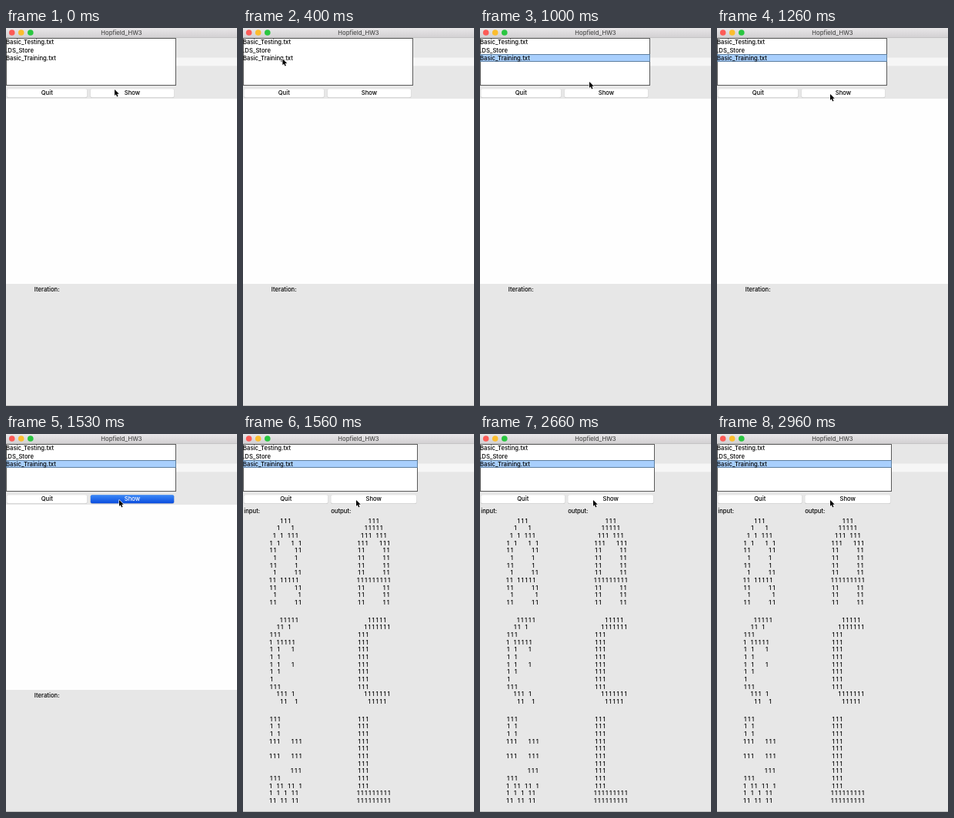
An HTML page with a canvas for the animation above (3000 ms loop, 300 px wide and 492 px high).

```html
<!DOCTYPE html>
<html lang="en">
<head>
<meta charset="utf-8">
<title>Hopfield_HW3</title>
<style>
html, body { margin: 0; width: 100%; height: 100%; overflow: hidden; background: #e7e7e7; }
canvas { display: block; }
</style>
</head>
<body>
<canvas id="stage" width="300" height="492"></canvas>
<script>
const ctx = document.getElementById('stage').getContext('2d');
const LOOP = 3000, SELECT = 500, PRESS = 1440, RESULT = 1560;
const FONT = '500 7.7px Inter, Roboto, sans-serif';
const ONE = 5, GAP = 4.5, PITCH = 9.64;

// Pointer keys: time, x, y
const PATH = [[30, 141, 80], [400, 51.4, 40.2], [590, 51.4, 40.2], [1000, 142, 70], [1100, 147, 86]];

const GRIDS = [
  { y: 113,
    input: ['   111   ', '  1   1  ', ' 1 1 111 ', '1 1   1 1', '11     11', ' 1     1 ',
            '11     1 ', ' 1     11', '11 11111 ', '11     11', ' 1      1', '11     11'],
    output: ['   111   ', '  11111  ', ' 111 111 ', '111   111', ...Array(4).fill('11     11'),
             '111111111', ...Array(3).fill('11     11')] },
  { y: 242,
    input: ['   11111 ', '  11 1   ', '111      ', '1 11111  ', '1 1   1  ', '1 1      ',
            '1 1   1  ', '1 1      ', '1        ', '111      ', '  111 1  ', '   11  1 '],
    output: ['   11111 ', '  1111111', ...Array(8).fill('111      '), '  1111111', '   11111 '] },
  { y: 371,
    input: ['111      ', '1 1      ', '1 1      ', '111   111', '', '111   111',
            '', '      111', '111      ', '1 11 11 1', '1 1 1 11 ', '11 11 11 '],
    output: [...Array(10).fill('111      '), '111111111', '111111111'] }
];

function rect(x, y, w, h, fill) {
  ctx.fillStyle = fill;
  ctx.fillRect(x, y, w, h);
}

function outline(x, y, w, h, stroke) {
  ctx.strokeStyle = stroke;
  ctx.lineWidth = 1;
  ctx.strokeRect(x + 0.5, y + 0.5, w - 1, h - 1);
}

function text(s, x, y, align = 'left', fill = '#000') {
  ctx.font = FONT;
  ctx.textAlign = align;
  ctx.fillStyle = fill;
  ctx.fillText(s, x, y);
}

function gradient(y0, y1, from, to) {
  const g = ctx.createLinearGradient(0, y0, 0, y1);
  g.addColorStop(0, from);
  g.addColorStop(1, to);
  return g;
}

function titleBar() {
  rect(0, 0, 300, 12, gradient(0, 12, '#e8e6e8', '#d3d1d3'));
  rect(0, 12, 300, 1, '#c4c4c4');
  [[7.7, '#fc5b57'], [19.7, '#fbbd2e'], [31.8, '#2ac640']].forEach(([x, fill]) => {
    ctx.fillStyle = fill;
    ctx.beginPath();
    ctx.arc(x, 6, 3.8, 0, Math.PI * 2);
    ctx.fill();
  });
  text('Hopfield_HW3', 150, 8.8, 'center', '#4a4a4a');
}

function listBox(w, selected) {
  rect(0, 13, w, 62, '#fff');
  outline(0, 13, w, 62, '#5a5a5a');
  if (selected) {
    rect(0, 34, w, 10, '#a8cffd');
    outline(0, 34, w, 10, '#5f7f9f');
  }
  ['Basic_Testing.txt', '.DS_Store', 'Basic_Training.txt']
    .forEach((name, i) => text(name, 0, 21.2 + i * 10.3));
}

function button(label, x, w, pressed) {
  ctx.beginPath();
  ctx.roundRect(x, 79.3, w, 11.6, 2);
  ctx.fillStyle = '#c9c9c9';
  ctx.fill();
  ctx.beginPath();
  ctx.roundRect(x + 0.3, 79.2, w - 0.6, 11.1, 2);
  ctx.fillStyle = pressed ? gradient(79, 91, '#3d8bf8', '#0748dc') : '#fff';
  ctx.fill();
  text(label, x + w / 2, 87.4, 'center', pressed ? '#fff' : '#000');
}

// Each line is centred; ones are a little wider than gaps.
function digits(rows, cx, top) {
  rows.forEach((row, r) => {
    const widths = [...row].map(c => c === '1' ? ONE : GAP);
    let x = cx - widths.reduce((a, b) => a + b, 0) / 2;
    widths.forEach((w, i) => {
      if (row[i] === '1') text('1', x + w / 2, top + r * PITCH + 2.8, 'center');
      x += w;
    });
  });
}

function pointerAt(t) {
  if (t <= PATH[0][0]) return PATH[0].slice(1);
  for (let i = 1; i < PATH.length; i++) {
    const [t0, x0, y0] = PATH[i - 1], [t1, x1, y1] = PATH[i];
    if (t < t1) {
      const p = (t - t0) / (t1 - t0), e = p * p * (3 - 2 * p);
      return [x0 + (x1 - x0) * e, y0 + (y1 - y0) * e];
    }
  }
  return PATH[PATH.length - 1].slice(1);
}

function pointer([x, y]) {
  ctx.save();
  ctx.translate(x, y);
  ctx.beginPath();
  [[0, 0], [0, 8], [1.8, 6.3], [3.1, 9.4], [4.5, 8.8], [3.2, 5.8], [5.8, 5.7]]
    .forEach(([px, py]) => ctx.lineTo(px, py));
  ctx.closePath();
  ctx.lineJoin = 'round';
  ctx.lineWidth = 1.2;
  ctx.strokeStyle = '#fff';
  ctx.stroke();
  ctx.fillStyle = '#000';
  ctx.fill();
  ctx.restore();
}

function draw(t) {
  const done = t >= RESULT;
  rect(0, 0, 300, 492, '#e7e7e7');
  rect(0, 38.5, 300, 10.8, '#f6f6f6');
  titleBar();
  listBox(done ? 227 : 221, t >= SELECT);
  if (done) {
    button('Quit', 1, 109.5, false);
    button('Show', 114, 111.5, false);
    text('input:', 1.3, 102.6);
    text('output:', 114.2, 102.6);
    GRIDS.forEach(g => {
      digits(g.input, 55.1, g.y);
      digits(g.output, 169.5, g.y);
    });
  } else {
    button('Quit', 1, 104.5, false);
    button('Show', 109.5, 109, t >= PRESS);
    rect(0, 92, 300, 241, '#fefefe');
    text('Iteration:', 36.8, 343.4);
  }
  rect(0, 491, 300, 1, '#bdbdbd');
  pointer(pointerAt(t));
}

const start = performance.now();
function tick() {
  draw((performance.now() - start) % LOOP);
  requestAnimationFrame(tick);
}
tick();
</script>
</body>
</html>
```
